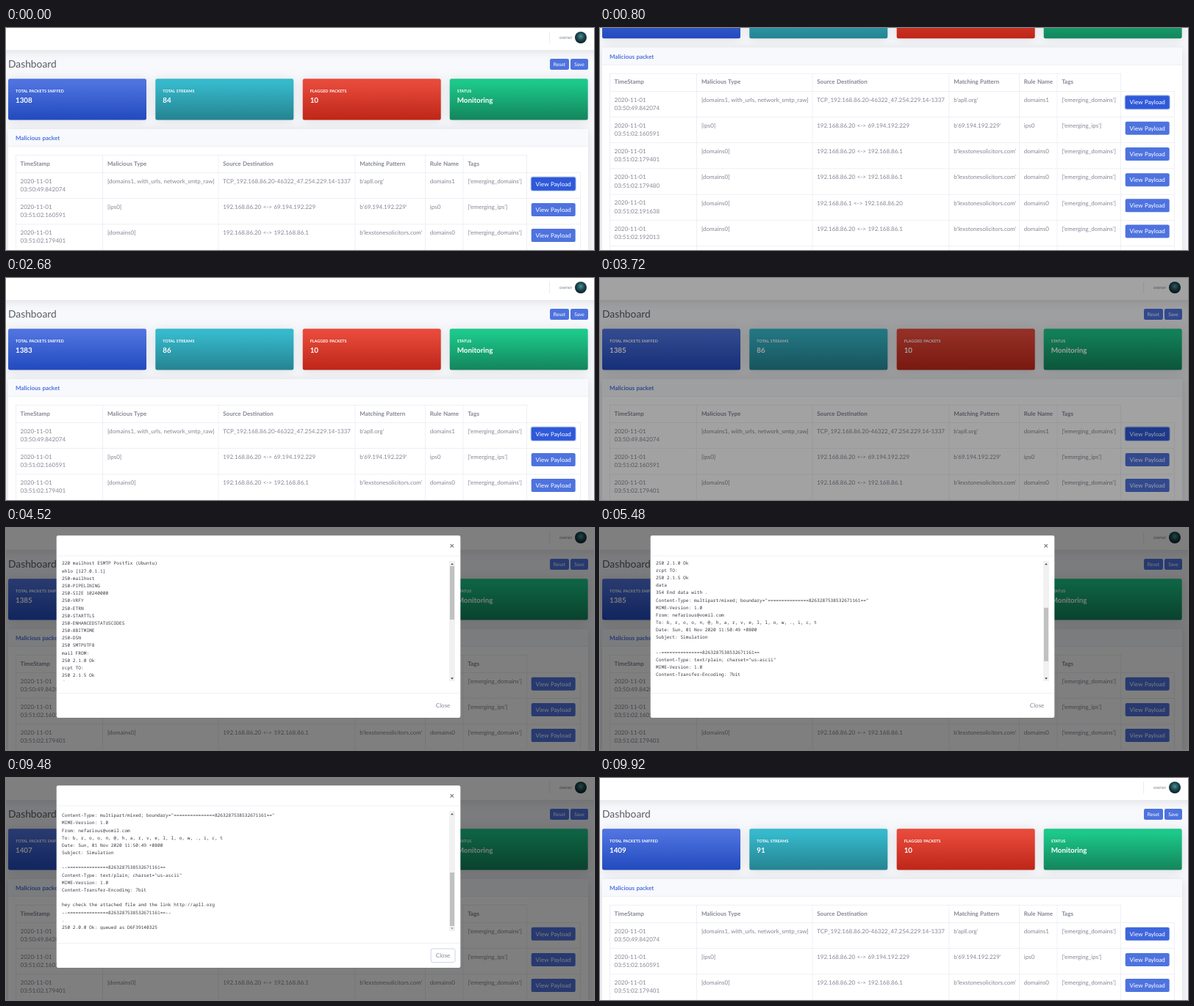
An HTML page that plays this animation: 800 px wide and 303 px high, repeating every 10000 ms.

```html
<!DOCTYPE html>
<html lang="en">
<head>
<meta charset="utf-8">
<title>Dashboard</title>
<style>
html, body { margin: 0; width: 100%; height: 100%; overflow: hidden; background: #f8f9fc; }
svg { display: block; width: 800px; height: 303px; }
text { font-family: Lato, "Open Sans", sans-serif; text-rendering: geometricPrecision; word-spacing: .4px; }
.mono { font-family: "Noto Sans Mono", "DejaVu Sans Mono", monospace; word-spacing: 0; }
.shadow { filter: drop-shadow(0 1.2px 7px rgba(58, 59, 69, .15)); }
</style>
</head>
<body>
<svg id="stage" viewBox="0 0 800 303">
  <defs>
    <clipPath id="view"><rect x="70" y="45" width="533" height="164"/></clipPath>
    <radialGradient id="face" cx=".5" cy=".4" r=".6">
      <stop offset="0" stop-color="#4f8f95"/>
      <stop offset=".5" stop-color="#1d4a52"/>
      <stop offset="1" stop-color="#0b1d24"/>
    </radialGradient>
  </defs>
  <g id="page"></g>
  <rect id="shade" width="800" height="303" opacity="0"/>
  <g id="modal" opacity="0"></g>
</svg>
<script>
const $ = id => document.getElementById(id);
const GREY = '#858796', BLUE = '#4e73df', LINE = '#e3e6f0';
const LOOP = 10000, TICK = 40;

function add(parent, tag, attrs, content) {
  const el = document.createElementNS('http://www.w3.org/2000/svg', tag);
  for (const k in attrs) el.setAttribute(k, attrs[k]);
  if (content !== undefined) el.textContent = content;
  parent.appendChild(el);
  return el;
}
const rect = (p, x, y, width, height, fill, more) => add(p, 'rect', { x, y, width, height, fill, ...more });
// cy is the middle of the capitals
const label = (p, s, x, cy, size, fill, more) =>
  add(p, 'text', { x, y: cy + size * .36, 'font-size': size, fill, ...more }, s);
const bold = { 'font-weight': 700 };
const middle = { 'text-anchor': 'middle' };

function button(p, s, x, y, w, h, size) {
  const box = rect(p, x, y, w, h, BLUE, { rx: 2.2 });
  label(p, s, x + w / 2, y + h / 2, size, '#fff', middle);
  return box;
}

function gradient(id, from, to) {
  const g = add(document.querySelector('defs'), 'linearGradient', { id, x2: 0, y2: 1 });
  add(g, 'stop', { offset: .1, 'stop-color': from });
  add(g, 'stop', { offset: 1, 'stop-color': to });
}

// Page
const page = $('page');
rect(page, 0, 0, 800, 700, '#f8f9fc');
rect(page, -20, -20, 840, 50, '#fff', { class: 'shadow' });
rect(page, 739.5, 5, .6, 16, '#d9dce6');
label(page, 'owner', 770.5, 13, 6.3, GREY, { 'text-anchor': 'end' });
add(page, 'circle', { cx: 782, cy: 13, r: 8, fill: 'url(#face)' });

label(page, 'Dashboard', 3, 49, 13.8, '#5a5c69');
button(page, 'Reset', 740, 42, 26, 15, 6.7);
button(page, 'Save', 768, 42, 24, 15, 6.7);

const cards = [
  ['TOTAL PACKETS SNIFFED', '1308', 3, '#4e73df', '#224abe'],
  ['TOTAL STREAMS', '84', 203.3, '#36b9cc', '#258391'],
  ['FLAGGED PACKETS', '10', 403.7, '#e74a3b', '#be2617'],
  ['STATUS', 'Monitoring', 603.7, '#1cc88a', '#13855c']
].map(([name, value, x, from, to], i) => {
  gradient('card' + i, from, to);
  rect(page, x, 69.3, 188, 56.2, `url(#card${i})`, { rx: 2.5, class: 'shadow' });
  label(page, name, x + 10, 86.5, 5.45, '#fff', bold);
  return label(page, value, x + 10, 98.3, 9.8, '#fff', bold);
});

// Table
const ROW = 35.2, TOP = 197.5;
rect(page, 3, 138, 789, 450, '#fff', { rx: 2.5, class: 'shadow' });
rect(page, 3.3, 138.3, 788.4, 23, '#f8f9fc', { rx: 2.5 });
rect(page, 3, 161, 789, .6, LINE);
label(page, 'Malicious packet', 13, 150, 8, BLUE, bold);

const cols = [13.3, 131.7, 289, 475, 570.6, 622, 708.5];
const heads = ['TimeStamp', 'Malicious Type', 'Source Destination', 'Matching Pattern', 'Rule Name', 'Tags'];
heads.forEach((s, i) => label(page, s, cols[i] + 6.2, 184.7, 8, GREY, bold));

const A = '192.168.86.20', B = '192.168.86.1', C = '69.194.192.229';
const hop = (a, b) => `${a} <-> ${b}`;
const lex = (time, a, b) =>
  [time, '[domains0]', hop(a, b), "b'lexstonesolicitors.com'", 'domains0', "['emerging_domains']"];
const rows = [
  ['03:50:49.842074', '[domains1, with_urls, network_smtp_raw]', 'TCP_192.168.86.20-46322_47.254.229.14-1337',
    "b'apll.org'", 'domains1', "['emerging_domains']"],
  ['03:51:02.160591', '[ips0]', hop(A, C), `b'${C}'`, 'ips0', "['emerging_ips']"],
  lex('03:51:02.179401', A, B),
  lex('03:51:02.179480', A, B),
  lex('03:51:02.191638', B, A),
  lex('03:51:02.192013', A, B),
  lex('03:51:02.203377', B, A),
  lex('03:51:02.203846', A, B)
];
const bottom = TOP + rows.length * ROW;
const ring = rect(page, 713.6, 202.5, 62.2, 20.2, '#b3c3f1', { rx: 3.2 });
const views = rows.map(([time, ...cells], i) => {
  const y = TOP + i * ROW;
  rect(page, 13, y - .3, 768.5, .6, LINE);
  label(page, '2020-11-01', 19.5, y + 11.3, 8, GREY);
  label(page, time, 19.5, y + 22.7, 8, GREY);
  cells.forEach((s, c) => label(page, s, cols[c + 1] + 6.2, y + 11.5, 8, GREY));
  return button(page, 'View Payload', 714.7, y + 6.2, 60, 18, 8.1);
});
rect(page, 13, 173, 695.8, .6, LINE);
cols.forEach(x => rect(page, x - .3, 173, .6, bottom - 173, LINE));
rect(page, 781.2, TOP, .6, bottom - TOP, LINE);

// Dialog
const modal = $('modal');
rect(modal, 68.7, 10.2, 549.6, 248.8, '#fff', { rx: 2.3 });
rect(modal, 69, 37.7, 549, .6, LINE);
rect(modal, 69, 225, 549, .6, LINE);
label(modal, '×', 606.7, 23.6, 11, '#6c6d74', { ...bold, ...middle });
const closeBox = rect(modal, 578.2, 233, 32.8, 18.6, '#fff', { rx: 2.5, stroke: '#ccd5ea', 'stroke-width': 1 });
label(modal, 'Close', 594.6, 242.3, 8, GREY, middle);

const mark = '='.repeat(15) + '8263287538532671161==';
const mail = `220 mailhost ESMTP Postfix (Ubuntu)
ehlo [127.0.1.1]
250-mailhost
250-PIPELINING
250-SIZE 10240000
250-VRFY
250-ETRN
250-STARTTLS
250-ENHANCEDSTATUSCODES
250-8BITMIME
250-DSN
250 SMTPUTF8
mail FROM:
250 2.1.0 Ok
rcpt TO:
250 2.1.5 Ok
data
354 End data with .
Content-Type: multipart/mixed; boundary="${mark}"
MIME-Version: 1.0
From: nefarious@vomil.com
To: ${[...'broon@harvellow.ict'].join(', ')}
Date: Sun, 01 Nov 2020 11:50:49 +0800
Subject: Simulation

--${mark}
Content-Type: text/plain; charset="us-ascii"
MIME-Version: 1.0
Content-Transfer-Encoding: 7bit

hey check the attached file and the link http://apll.org
--${mark}--
.
250 2.0.0 Ok: queued as D6F39140325`.split('\n');
const PITCH = 10.18, MAX = 183;
const mailBody = add(add(modal, 'g', { 'clip-path': 'url(#view)' }), 'g', {});
mail.forEach((s, i) =>
  label(mailBody, s, 76, 51 + MAX + (i - 18) * PITCH, 6.197, '#3a3b45', { class: 'mono' }));

rect(modal, 603, 45, 8, 164, '#f1f1f1');
const up = add(modal, 'path', { d: 'M605 50.3h4l-2-2.4z' });
const down = add(modal, 'path', { d: 'M605 204.3h4l-2 2.4z' });
const thumb = rect(modal, 604, 51, 6, 73, '#c1c1c1');

// Motion: [time, value]
const pageScroll = [[480, 0], [920, 136], [1880, 136], [1920, 119.5], [1960, 119.5], [2520, 0]];
const mailScroll = [[4480, 0], [4760, 45.5], [4840, 45.5], [5120, 91], [5200, 91],
  [5480, 135.7], [5520, 136.5], [5560, 136.5], [6000, MAX]];
const shadeFade = [[3560, 0], [3780, .5], [9760, .5], [9920, 0]];
const modalFade = [[3880, 0], [4080, 1], [9520, 1], [9760, 0]];
const modalDrop = [[3880, -24], [4280, 0], [9520, 0], [9760, -24]];
const packets = [[0, 1308], [1000, 1366], [2100, 1378], [2680, 1383], [2920, 1385], [5640, 1391],
  [6200, 1392], [7000, 1397], [7200, 1400], [7280, 1401], [7360, 1403], [7440, 1404], [7480, 1405],
  [8480, 1407], [9600, 1409]];
const streams = [[0, 84], [1000, 86], [4300, 91]];

const linear = k => k;
const smooth = k => k * k * (3 - 2 * k);
const easeOut = k => 1 - (1 - k) ** 2;

function at(points, t, ease) {
  const i = points.findIndex(p => p[0] > t);
  if (i === 0) return points[0][1];
  if (i < 0) return points[points.length - 1][1];
  const [t0, a] = points[i - 1], [t1, b] = points[i];
  return a + (b - a) * ease((t - t0) / (t1 - t0));
}
const latest = (steps, t) => steps.filter(s => s[0] <= t).pop()[1];
const show = (el, on) => el.setAttribute('visibility', on ? 'inherit' : 'hidden');

function draw(now) {
  const t = Math.floor(now % LOOP / TICK) * TICK;
  page.setAttribute('transform', `translate(0 ${-at(pageScroll, t, smooth)})`);
  cards[0].textContent = latest(packets, t);
  cards[1].textContent = latest(streams, t);

  const focused = t < 3880;
  show(ring, focused);
  views[0].setAttribute('fill', focused ? '#2e59d9' : t >= 9920 ? '#3f66dc' : BLUE);

  $('shade').setAttribute('opacity', at(shadeFade, t, linear));
  modal.setAttribute('opacity', at(modalFade, t, linear));
  modal.setAttribute('transform', `translate(0 ${at(modalDrop, t, easeOut)})`);
  show(closeBox, t >= 9480);

  const s = at(mailScroll, t, smooth);
  mailBody.setAttribute('transform', `translate(0 ${-s})`);
  thumb.setAttribute('y', 51 + s / MAX * 78);
  up.setAttribute('fill', s > 0 ? '#505050' : '#a3a3a3');
  down.setAttribute('fill', s < MAX ? '#505050' : '#a3a3a3');
}

function loop() {
  draw(performance.now());
  requestAnimationFrame(loop);
}
loop();
</script>
</body>
</html>
```
